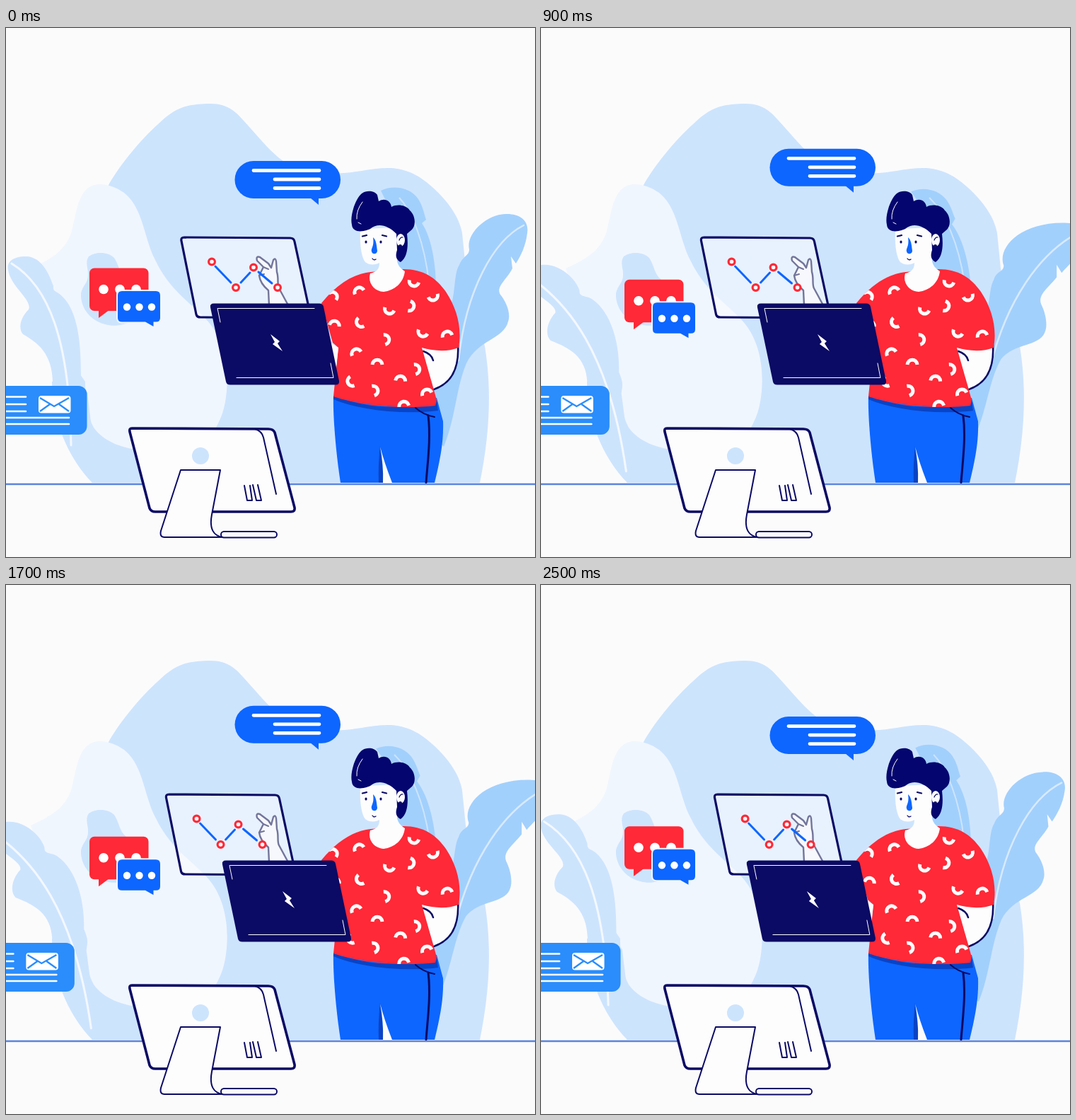
An HTML page that plays this animation: 748 px wide and 748 px high, repeating every 2600 ms.

```html
<!DOCTYPE html>
<html>
<head>
<meta charset="utf-8">
<style>
html, body { margin: 0; height: 100%; overflow: hidden; background: #fbfbfc; }
svg { display: block; width: 100vw; height: 100vh; }
.ink { fill: none; stroke: #0b0a64; stroke-linecap: round; stroke-linejoin: round; }
.white { fill: none; stroke: #fff; stroke-linecap: round; }
</style>
</head>
<body>
<svg viewBox="0 0 748 748">
  <!-- backdrop -->
  <path fill="#cde4fd" d="M122 643C90 610 66 560 65 500L112 490L145 222C160 195 190 158 215 136C240 112 255 108 285 107C315 106 325 118 345 141C362 160 377 178 392 188C420 204 450 207 478 205C505 203 520 197 545 198C572 200 590 213 604 226C626 246 641 268 645 290L650 340L677 450C687 510 684 575 670 643Z"/>
  <path fill="#f0f6fe" d="M115 227C128 216 150 221 167 233C195 255 195 300 212 330C232 373 270 395 289 419C310 446 316 485 311 522C308 545 301 558 294 570L280 600L190 597C165 594 138 585 124 565C113 545 112 520 112 500L70 440L35 340C60 328 82 318 92 290C99 265 100 240 115 227Z"/>
  <path fill="#cde4fd" d="M117 323C128 315 145 317 153 325C160 335 160 348 170 356C185 367 198 380 194 398C188 415 160 425 140 419C118 413 105 395 106 375C108 365 116 360 116 350C117 340 111 332 117 323Z"/>
  <path id="midLeaf" fill="#a2d0fc"/>
  <path id="midVein" fill="none" stroke="#cde4fd" stroke-width="2"/>
  <path id="rightLeaf" fill="#a2d0fc"/>
  <path id="rightVein" fill="none" stroke="#d8eafe" stroke-width="2.5" stroke-linecap="round"/>
  <path id="leftLeaf" fill="#cde4fd"/>
  <path id="leftVein" fill="none" stroke="#f3f8fe" stroke-width="3" stroke-linecap="round"/>

  <!-- person -->
  <path fill="#0d66ff" d="M463 520C462 550 467 605 473 643H606C614 610 619 585 618 556L609 523Z"/>
  <path fill="#0a43c4" d="M463 520C510 538 560 541 609 526L611 541C565 547 500 541 463 525Z"/>
  <path fill="#0a43c4" d="M529 591Q526 617 527 643H535Z"/>
  <path fill="#fbfbfc" d="M529 592Q534 618 533 643H546Q535 615 529 592Z"/>
  <path class="ink" stroke-width="2" d="M579 537Q590 547 606 550"/>
  <path class="ink" stroke-width="3" d="M597 548C601 580 596 615 594 643"/>
  <path fill="#fdfdfe" d="M586 450L640 448C641 480 629 503 605 511Z"/>
  <path class="ink" stroke-width="2.5" d="M639 448C641 482 629 503 605 511M590 457Q602 461 604 470"/>
  <path id="shirt" fill="#ff2937" d="M516 345C492 347 468 362 446 389L462 445L470 452L463 521C505 535 560 539 607 534L609 526L588 452C605 457 625 458 640 452C645 425 638 397 622 373C608 353 590 341 562 341Z"/>
  <clipPath id="shirtClip"><use href="#shirt"/></clipPath>
  <g id="arcs" class="white" stroke-width="5" clip-path="url(#shirtClip)" style="stroke-linecap:butt"></g>
  <path fill="#fdfdfe" d="M450 438Q462 448 470 452L467 478L450 480Z"/>
  <path fill="#fdfdfe" d="M501 284C500 305 502 323 508 331C514 336 523 335 528 332C528 341 524 345 515 347C511 360 520 372 534 373C549 371 562 361 564 344C558 340 554 336 553 329L562 309V282Z"/>
  <path fill="#04056e" d="M489 278C486 266 494 241 503 234C510 229 521 230 525 236L527 245C535 240 544 244 545 253C554 248 567 251 571 258C579 265 580 279 574 285L567 291C569 308 568 324 558 331C552 328 550 323 553 314L552 291C540 279 526 275 515 284C507 288 490 291 489 278Z"/>
  <path class="white" stroke-width="1" d="M504 246Q495 258 496 270M498 275L502 277"/>
  <ellipse cx="558" cy="300" rx="6" ry="9" fill="#fdfdfe"/>
  <path class="ink" stroke-width="1.3" d="M556 300Q558 295 561 296M518 326Q520 329 523 327"/>
  <circle cx="557.5" cy="308.5" r="2.5" fill="#0b0a64"/>
  <path class="ink" stroke-width="2.2" d="M504 294.500L510 293M532 293L538 294.500"/>
  <path class="ink" stroke-width="3" d="M509 302v1M530 302v1"/>
  <path fill="#0d66ff" d="M519 296C524 300 524 309 525 315C525 320 518 321 517 316C516 311 521 309 519 296Z"/>

  <path stroke="#5b84dd" stroke-width="2.6" d="M0 645H748"/>

  <!-- desktop monitor -->
  <path class="ink" style="fill:#fdfdfe" stroke-width="3.6" d="M178 566L371 567Q378 567 380 572L408 678Q409 684 403 684H211Q205 684 203 679L175 571Q174 566 178 566Z"/>
  <path class="ink" stroke-width="2" d="M352 567Q362 570 364 579L382 659M337 647L341 668H348L345 647M349 646L354 668H361L356 646"/>
  <circle cx="275" cy="605" r="12" fill="#cde4fd"/>
  <path class="ink" style="fill:#fdfdfe" stroke-width="2" d="M247 625H303L291 688C287 709 294 718 306 720H224Q217 720 219 711Z"/>
  <rect class="ink" style="fill:#fdfdfe" stroke-width="2" x="304" y="712" width="79" height="8.5" rx="4.2"/>

  <!-- see-through screen with chart -->
  <g data-dx="-31">
    <path class="ink" style="fill:rgba(251,252,255,.6)" stroke-width="3.2" d="M252 296L402 297Q407 297 408 302L430 404Q430 410 425 410L275 409Q270 409 269 405L248 301Q247 296 252 296Z"/>
  </g>
  <path fill="#f6f8fd" stroke="#73759a" stroke-width="2.400" stroke-linejoin="round" d="M372 392L371 371C365 366 359 358 358 350L364 338L355 329Q353 322 359 324L371 333L375 339L378 328Q381 324 382 330L383 345C386 354 383 362 386 368L399 392Z"/>
  <path fill="none" stroke="#73759a" stroke-width="2" stroke-linecap="round" d="M364 338L371 341M358 350L365 348"/>
  <g data-dx="-31">
    <path fill="none" stroke="#0d66ff" stroke-width="3" stroke-linecap="round" d="M296 337L318 360M332 360L345 346M357 345L376 361"/>
    <g fill="#fdfdfe" stroke="#ff2937" stroke-width="3.2">
      <circle cx="291" cy="330.5" r="4.4"/><circle cx="325" cy="367" r="4.4"/>
      <circle cx="350" cy="338.5" r="4.4"/><circle cx="384" cy="367" r="4.4"/>
    </g>
  </g>

  <!-- laptop -->
  <g data-dx="24.5">
    <path fill="#0b0a64" d="M294 389.500H443Q448 389.500 449 394L471 499Q472 504.500 466 504.500H317Q312 504.500 311 500L289 395Q288 389.500 294 389.500Z"/>
    <path class="white" stroke-width="1" d="M303 416L299 396.500H436M326 494.500H463L459 474"/>
    <path fill="#fff" d="M374 433L387 443L384 446L391 457L377 447L380 444Z"/>
  </g>

  <!-- floating messages -->
  <g data-dx="-25.5">
    <rect x="-30" y="506" width="144.500" height="69" rx="12" fill="#2a8dfb"/>
    <path class="white" stroke-width="2.6" d="M-20 521.500H28M-20 532H28M-20 542H28M-20 551H89M-20 560H89"/>
    <rect x="46" y="520" width="45.500" height="24.500" rx="4" fill="#fff"/>
    <path fill="none" stroke="#2a8dfb" stroke-width="2.3" d="M48 523L68 535L89 523M48 542L62 532M89 542L75 532"/>
  </g>
  <g data-dy="23.5">
    <rect x="118" y="339.500" width="83.500" height="60.500" rx="7" fill="#ff2937"/>
    <path fill="#ff2937" d="M131 398V410L147 398Z"/>
    <g fill="#fff"><circle cx="138" cy="369.500" r="6.800"/><circle cx="161" cy="369.500" r="6.800"/><circle cx="184" cy="369.500" r="6.800"/></g>
    <path fill="#0d66ff" stroke="#f0f6fe" stroke-width="4" paint-order="stroke" d="M164 372H212Q218 372 218 378V410Q218 415.500 212 415.500H208.500V422L197 415.500H164Q158 415.500 158 410V378Q158 372 164 372Z"/>
    <g fill="#fff"><circle cx="171" cy="394.500" r="5.200"/><circle cx="188.500" cy="394.500" r="5.200"/><circle cx="206" cy="394.500" r="5.200"/></g>
  </g>
  <g data-dy="-24.8">
    <rect x="323.500" y="188" width="149.500" height="53" rx="26.500" fill="#0d66ff"/>
    <path fill="#0d66ff" d="M430 240L442 250V236Z"/>
    <path class="white" stroke-width="4.800" d="M350 201.500H443M380 214H443M380 226.500H443"/>
  </g>
</svg>
<script>
const LOOP = 2600, STEP = 100;

// Each plant shape sways between two poses
const poses = {
  rightLeaf: [
    "M706 263C726 262 740 272 737 290C735 308 728 322 721 333L714 323L716 340C708 356 692 366 699 377C708 388 714 404 710 415C704 440 668 440 651 474C636 510 636 550 619 592L590 560L612 420C640 400 630 350 641 335C646 322 655 322 655 313C650 292 678 264 706 263Z",
    "M752 281C775 280 790 292 782 308C775 326 755 340 743 352L736 340L735 358C722 372 706 382 711 397C717 412 718 430 713 438C704 455 668 448 650 466C634 490 628 530 617 556L590 560L612 420C640 410 630 385 640 365C644 352 654 356 654 346C643 322 672 281 752 281Z"],
  rightVein: ["M732 279C690 300 650 370 640 470", "M785 288C710 320 660 400 634 480"],
  leftLeaf: [
    "M30 323C15 322 0 328 3 342C6 365 38 385 32 398C20 410 17 425 24 433C45 445 65 460 66 500L75 565L122 643L130 640L115 515C106 505 108 500 106 492C106 450 103 400 78 378C72 372 66 374 67 365C60 345 50 325 30 323Z",
    "M-5 340C-25 340 -40 348 -35 360C-30 378 18 392 15 405C3 418 0 438 9 446C40 456 63 468 65 500L75 565L122 643L130 640L113 517C121 500 118 498 112 484C114 450 100 405 70 386C60 380 48 385 49 374C44 358 18 340 -5 340Z"],
  leftVein: ["M8 333C60 365 90 440 92 590", "M-40 352C30 395 100 470 133 643"],
  midLeaf: [
    "M530 230C548 221 573 226 583 242C591 255 591 264 594 271L588 276C602 297 609 335 608 380L600 420L560 380L540 250Z",
    "M520 232C540 224 560 231 570 245C577 255 578 262 582 269L578 278C596 300 607 340 610 390L600 420L560 380L535 250Z"],
  midVein: ["M556 240C575 260 592 305 598 360", "M546 240C570 262 590 305 599 360"]
};
const numbers = /-?\d+(\.\d+)?/g;
function blend([a, b], p) {
  const end = b.match(numbers);
  let i = 0;
  return a.replace(numbers, n => (+n + (end[i++] - n) * p).toFixed(2) + " ");
}

// Shirt pattern: x, y, turn in degrees
const arcs = [
  [464, 377, 40], [498, 370, -25], [576, 362, 195], [605, 382, 160], [541, 401, 200],
  [574, 394, 105], [499, 418, 235], [465, 417, 10], [588, 433, 205], [623, 432, -15],
  [539, 440, 80], [494, 457, -25], [525, 472, 0], [558, 495, 5], [582, 482, 80],
  [486, 501, 245], [523, 512, 75], [594, 514, -20], [562, 531, -10]
];
document.getElementById("arcs").innerHTML = arcs.map(([x, y, turn]) =>
  `<path d="M-7 4C-6 -5 6 -5 7 4" transform="translate(${x} ${y}) rotate(${turn})"/>`).join("");

const movers = document.querySelectorAll("[data-dx], [data-dy]");

function draw(now) {
  const t = Math.floor(now % LOOP / STEP) * STEP;
  const p = 1 - Math.abs(1 - t / (LOOP / 2));
  for (const el of movers) {
    const { dx = 0, dy = 0 } = el.dataset;
    el.setAttribute("transform", `translate(${dx * p} ${dy * p})`);
  }
  for (const id in poses) document.getElementById(id).setAttribute("d", blend(poses[id], p));
}

let start;
function tick(now) {
  start ??= now;
  draw(now - start);
  requestAnimationFrame(tick);
}
draw(0);
requestAnimationFrame(tick);
</script>
</body>
</html>
```
